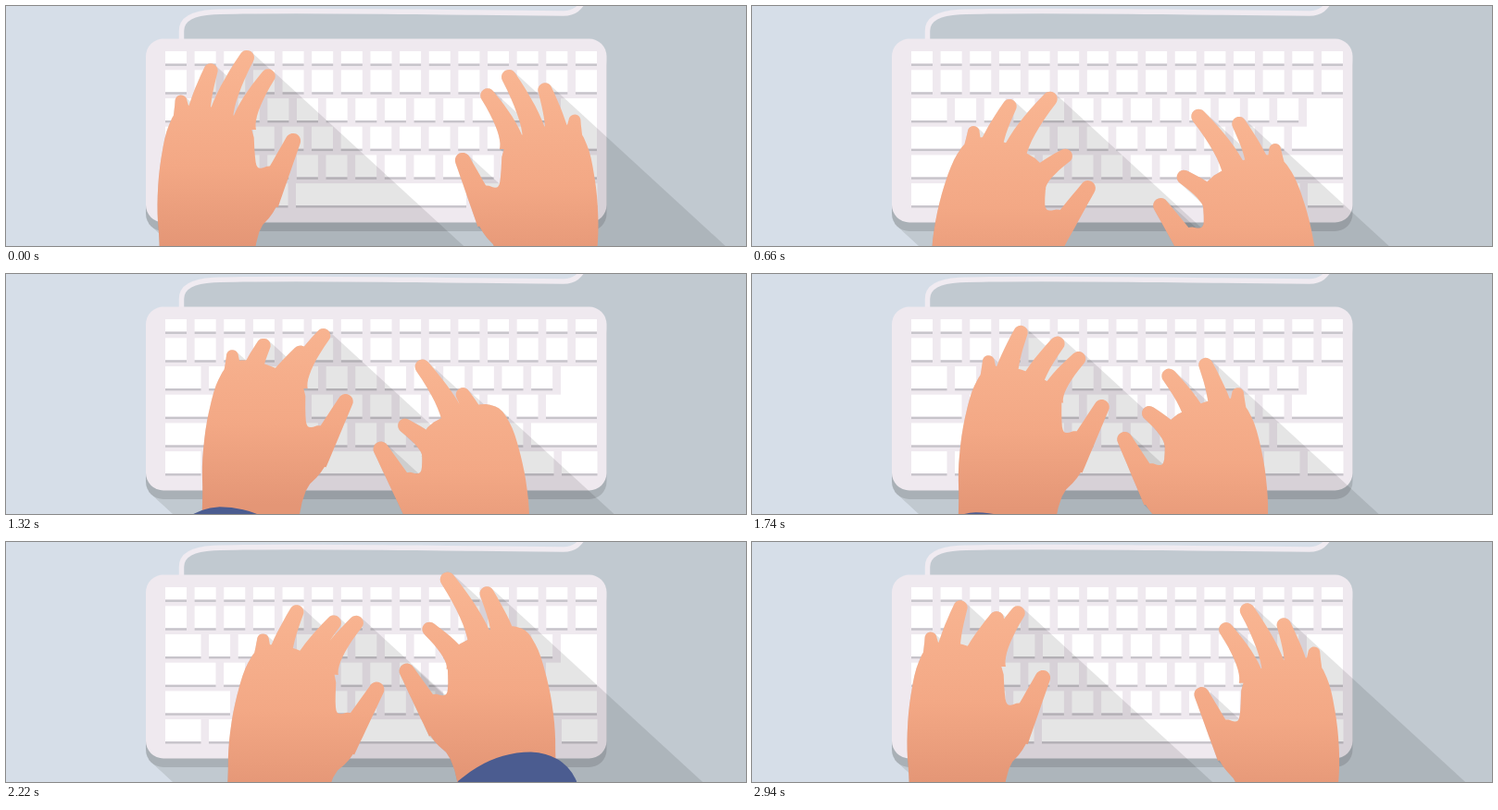
An HTML page that plays this animation: 799 px wide and 260 px high, repeating every 3 s.

```html
<!DOCTYPE html>
<html lang="en">
<head>
<meta charset="utf-8">
<title>Typing hands</title>
<style>
  html, body { margin: 0; width: 100%; height: 100%; overflow: hidden; background: #d6dee8; }
  svg { display: block; width: 799px; height: 260px; }
</style>
</head>
<body>
<svg viewBox="0 0 799 260">
  <defs>
    <linearGradient id="skin" gradientUnits="userSpaceOnUse" x1="0" x2="0" y1="-130" y2="86">
      <stop offset="0" stop-color="#f9b693"/>
      <stop offset=".6" stop-color="#f3a885"/>
      <stop offset="1" stop-color="#e49676"/>
    </linearGradient>
  </defs>
  <rect width="799" height="260" fill="#d6dee8"/>
  <path d="M189.500 38V27C189.500 13 204 7.500 224 6.500C300 4 400 6 500 7L602 8C614 8 620 2 625 -8H799V260H180L154 236Z" fill="#c1c9d0"/>
  <path d="M189.500 38V27C189.500 13 204 7.500 224 6.500C300 4 400 6 500 7L602 8C614 8 620 2 625 -8" fill="none" stroke="#f0ebf1" stroke-width="5.500"/>
  <rect x="151" y="45" width="497.500" height="199" rx="19" fill="#a9b0b6"/>
  <rect x="151" y="35.500" width="497.500" height="199" rx="19" fill="#efe9ef"/>
  <g id="keys"></g>
  <g id="shadows" fill-opacity=".1"></g>
  <g id="hands"></g>
</svg>
<script>
const LOOP = 3000, STEP = 60;
const NS = 'http://www.w3.org/2000/svg';
const $ = id => document.getElementById(id);

function add(parent, tag, attrs) {
  const el = document.createElementNS(NS, tag);
  for (const name in attrs) el.setAttribute(name, attrs[name]);
  return parent.appendChild(el);
}

// Keyboard
const PITCH = 31.64, LEFT_EDGE = 172, RIGHT_EDGE = 638;
const rowTop = row => 69.3 + 30.7 * row;

function key(x, y, width = 23, height = 24) {
  add($('keys'), 'rect', { x, y, width, height, fill: '#fff' });
  add($('keys'), 'rect', { x, y: y + height, width, height: 2.4, fill: '#c7c4ca' });
}
function keyRow(x, y, count, height) {
  for (let i = 0; i < count; i++) key(x + i * PITCH, y, 23, height);
}
// A wide key at each end with small keys between them
function framedRow(row, firstWidth, count, lastX) {
  const y = rowTop(row);
  key(LEFT_EDGE, y, firstWidth);
  keyRow(LEFT_EDGE + firstWidth + 8.6, y, count);
  key(lastX, y, RIGHT_EDGE - lastX);
}
keyRow(LEFT_EDGE, 49, 15, 13.5);
keyRow(LEFT_EDGE, rowTop(0), 15);
framedRow(1, 38.5, 12, 599);
framedRow(2, 54.5, 11, 583);
framedRow(3, 70, 10, 567);
add($('keys'), 'rect', { x: 599, y: 120, width: 39, height: 20, fill: '#fff' });
for (let i = 0; i < 3; i++) {
  key(LEFT_EDGE + 47 * i, rowTop(4), 38.5);
  key(506 + 47 * i, rowTop(4), 38.5);
}
key(313, rowTop(4), 184);

// Hand anatomy, relative to the thumb web, with the thumb to the right
const PALM = [
  [-104, 150], [-104, 86], [-107, 46], [-105, 6], [-98, -36], [-87, -61], [-70, -68],
  [-43, -64], [-3, -46], [-1, -4], [3, 3], [16, -2], [34, 12], [21, 48], [0, 71], [-6, 150]
];
const FINGERS = [
  { name: 'pinky', base: [-79, -38], tip: [-81, -71], baseR: 14, tipR: 6.5 },
  { name: 'ring', base: [-63, -45], tip: [-49, -104], baseR: 14.5, tipR: 7.7 },
  { name: 'middle', base: [-39, -43], tip: [-10, -118], baseR: 14.5, tipR: 8 },
  { name: 'index', base: [-14, -40], tip: [13, -98], baseR: 14, tipR: 7.8 },
  { name: 'thumb', base: [10, 38], tip: [40, -28], baseR: 15, tipR: 8.2 }
];
const SLEEVE = 'M-62 70L-51 31Q-38 2 -2 0Q40 0 76 31L110 70Z';

// Place of the thumb web, tilt in degrees, and how far each finger is pulled in
const LEFT = [
  { t: 0, x: 270, y: 174, tilt: 0 },
  { t: 660, x: 316, y: 219, tilt: 8, index: 39 },
  { t: 1140, x: 320, y: 157, tilt: 5 },
  { t: 1320, x: 324, y: 164, tilt: 3, ring: 20, middle: 40 },
  { t: 1740, x: 335, y: 170, tilt: 3, middle: 24, index: 19 },
  { t: 2220, x: 356, y: 184, tilt: 5, middle: 22 },
  { t: 2520, x: 342, y: 184, tilt: 8, ring: 37, index: 12 },
  { t: 2940, x: 274, y: 175, tilt: 0, middle: 26 }
];
const RIGHT = [
  { t: 0, x: 533, y: 195, tilt: 0 },
  { t: 660, x: 488, y: 238, tilt: 8, index: 43 },
  { t: 1140, x: 468, y: 206, tilt: 6, index: 43 },
  { t: 1320, x: 449, y: 214, tilt: 5, index: 47, middle: 5, ring: 25, pinky: 17 },
  { t: 1740, x: 445, y: 205, tilt: 3, index: 43, middle: 24 },
  { t: 2220, x: 477, y: 164, tilt: 5, index: 27, middle: -5, pinky: 30 },
  { t: 2520, x: 479, y: 177, tilt: 6, middle: -3, ring: 15, pinky: -6 }
];

const mix = (a, b, k) => a + (b - a) * k;
const mixPoint = (a, b, k) => [mix(a[0], b[0], k), mix(a[1], b[1], k)];

// Returns a reader for any pose value at time t, absent values being zero
function poseAt(poses, t) {
  const i = poses.findLastIndex(p => p.t <= t);
  const from = poses[i], to = poses[i + 1] || { ...poses[0], t: LOOP };
  const k = (t - from.t) / (to.t - from.t);
  return name => mix(from[name] || 0, to[name] || 0, k);
}

// Corner cutting on a closed outline
function smooth(points) {
  return points.flatMap((a, i) => {
    const b = points[(i + 1) % points.length];
    return [mixPoint(a, b, 0.22), mixPoint(a, b, 0.78)];
  });
}
const palmOutline = smooth(smooth(PALM));

// Tapered finger along a quadratic curve with a round tip
function finger(base, bend, tip, baseR, tipR) {
  const left = [], right = [], cap = [];
  let angle = 0;
  for (let i = 0; i <= 10; i++) {
    const k = i / 10, r = mix(baseR, tipR, k);
    const a = mixPoint(base, bend, k), b = mixPoint(bend, tip, k);
    const [x, y] = mixPoint(a, b, k);
    angle = Math.atan2(b[1] - a[1], b[0] - a[0]);
    const nx = Math.sin(angle) * r, ny = -Math.cos(angle) * r;
    left.push([x + nx, y + ny]);
    right.unshift([x - nx, y - ny]);
  }
  for (let i = 1; i < 10; i++) {
    const a = angle - Math.PI / 2 + Math.PI * i / 10;
    cap.push([tip[0] + Math.cos(a) * tipR, tip[1] + Math.sin(a) * tipR]);
  }
  return [...left, ...cap, ...right];
}

function area(points) {
  return points.reduce((sum, a, i) => {
    const b = points[(i + 1) % points.length];
    return sum + a[0] * b[1] - a[1] * b[0];
  }, 0);
}
// All outlines share one winding so that overlaps never cancel out
function toPath(points) {
  const ring = area(points) < 0 ? [...points].reverse() : points;
  return 'M' + ring.map(p => p[0].toFixed(1) + ' ' + p[1].toFixed(1)).join('L') + 'Z';
}

// Long shadow: every edge swept down to the right
const cast = p => [p[0] + 440, p[1] + 405];
function sweep(points) {
  return points.map((a, i) => {
    const b = points[(i + 1) % points.length];
    return toPath([a, b, cast(b), cast(a)]);
  }).join('');
}

function createHand(poses, side, cuff) {
  const id = side > 0 ? 'skinLeft' : 'skinRight';
  const skin = add(document.querySelector('defs'), 'linearGradient', { id, href: '#skin' });
  const shadow = add($('shadows'), 'path', {});
  const body = add($('hands'), 'path', { fill: `url(#${id})` });
  const sleeve = add($('hands'), 'path', { d: SLEEVE, fill: '#4b5c90' });

  return t => {
    const pose = poseAt(poses, t);
    const x = pose('x'), y = pose('y'), tilt = pose('tilt');
    const c = Math.cos(tilt * Math.PI / 180), s = Math.sin(tilt * Math.PI / 180);
    const spread = 1 + tilt * 0.01;
    const place = ([px, py]) => [
      x + side * (px * spread * c - py * s),
      y + px * spread * s + py * c
    ];

    const outlines = FINGERS.map(({ name, base, tip, baseR, tipR }) => {
      const pull = pose(name);
      const root = [base[0], base[1] + Math.max(0, pull) * 0.5];
      const end = [tip[0], tip[1] + pull];
      const rise = name === 'thumb' ? mixPoint(root, end, 0.5)
        : [root[0], mix(root[1], end[1], 0.35)];
      return finger(place(root), place(rise), place(end), baseR, tipR);
    });
    outlines.push(palmOutline.map(place));

    skin.setAttribute('gradientTransform', `translate(0 ${y})`);
    body.setAttribute('d', outlines.map(toPath).join(''));
    shadow.setAttribute('d', outlines.map(sweep).join(''));
    const [cx, cy] = place(cuff);
    sleeve.setAttribute('transform', `translate(${cx} ${cy}) scale(${side} 1)`);
  };
}

const hands = [createHand(LEFT, 1, [-84, 93]), createHand(RIGHT, -1, [-78, 71])];

function render(ms) {
  const t = Math.floor((ms % LOOP) / STEP) * STEP;
  hands.forEach(draw => draw(t));
}

const start = performance.now();
function tick() {
  render(performance.now() - start);
  requestAnimationFrame(tick);
}
tick();
</script>
</body>
</html>
```
